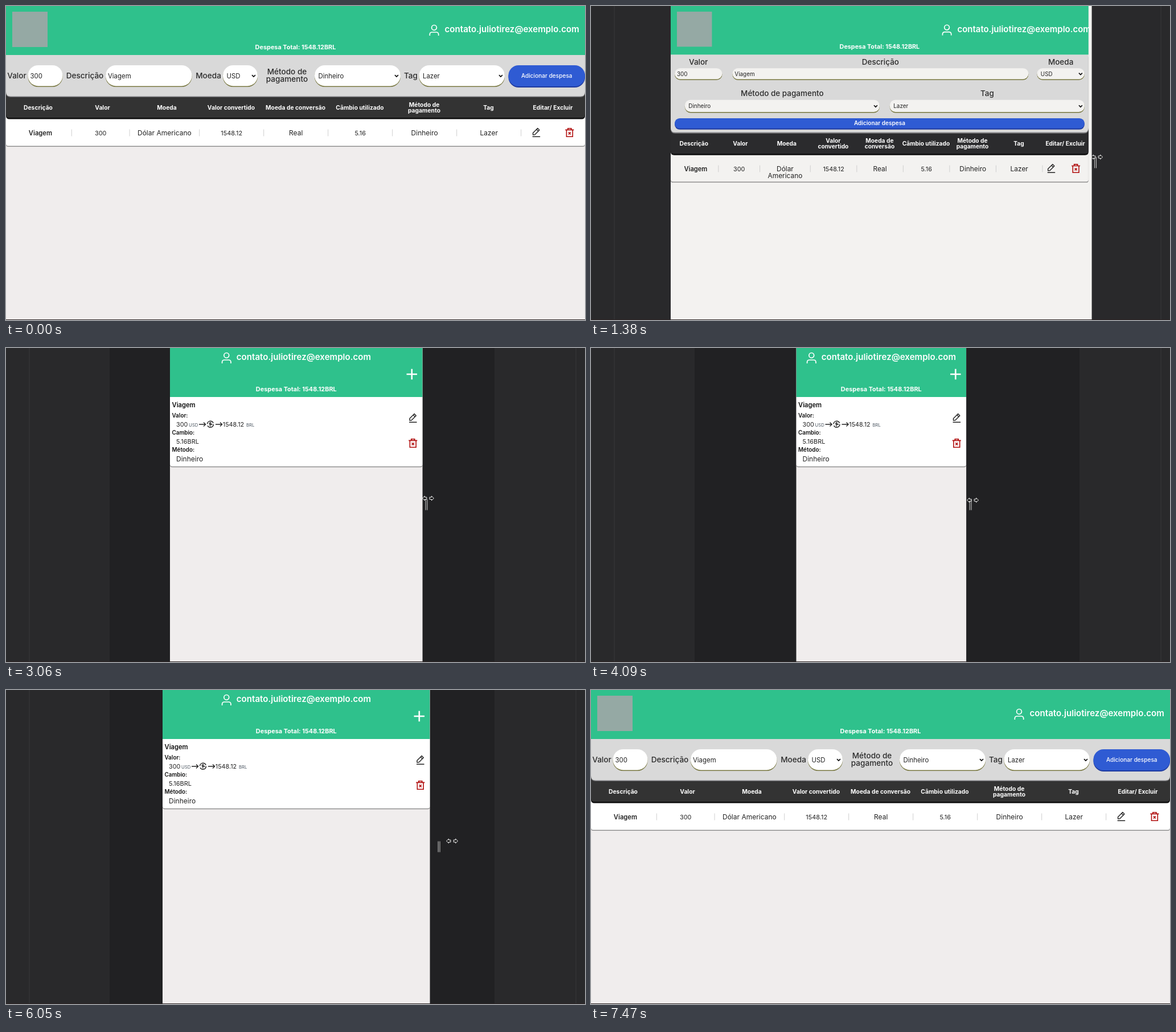
Recreate the animation shown at these times as an HTML page. Size 1017 by 551 pixels, loop 8 s.

```html
<!DOCTYPE html>
<html lang="pt-BR">
<head>
<meta charset="utf-8">
<title>Carteira de despesas</title>
<style>
html, body { margin: 0; width: 100%; height: 100%; overflow: hidden; background: #212123; }
svg { display: block; width: 1017px; height: 551px; font-family: Inter, Roboto, sans-serif; }
</style>
</head>
<body>
<svg id="stage" viewBox="0 0 1017 551" xmlns="http://www.w3.org/2000/svg"></svg>
<script>
const LOOP = 8000;
const EMAIL = 'contato.juliotirez@exemplo.com';
const INK = '#222', RED = '#b00d0d', GREEN = '#2fc18c';
const stage = document.getElementById('stage');

// [time, left edge of the viewport], held until the next entry
const steps = [
  [0, 0], [280, 6], [400, 16], [520, 30], [640, 42],
  [780, 56], [900, 72], [1020, 88], [1140, 104], [1260, 122], [1380, 140], [1500, 154],
  [1620, 168], [1740, 182], [1860, 196], [1980, 208], [2100, 220], [2220, 230],
  [2370, 239], [2490, 247], [2640, 253], [2760, 258], [2910, 270], [3060, 288], [3180, 306],
  [3320, 318], [3440, 328], [3590, 345], [3710, 360], [4090, 360.5], [4210, 362], [4330, 365],
  [4450, 367], [4740, 368], [4860, 369], [5660, 364], [5810, 335], [5930, 304], [6050, 275],
  [6200, 240], [6320, 207], [6440, 176], [6590, 148], [6710, 120], [6840, 92],
  [6990, 66], [7110, 42], [7230, 20], [7350, 6], [7470, 0]
];

// [time, pointer offset, pointer y, grip offset], eased linearly
const pointer = [
  [280, 9, 268, 7], [1380, 9, 265, 6.5], [2220, 8.5, 261, 6.5], [4090, 11.5, 267, 7.5],
  [4860, 12, 267, 7.5], [5660, 20, 267, 10], [6050, 39, 265, 16], [6440, 24, 272, 12],
  [6840, 19.5, 280, 10], [7470, 14, 280, 8]
];

const rect = (x, y, w, h, fill, r = 0) =>
  `<rect x="${x}" y="${y}" width="${w}" height="${h}" rx="${r}" fill="${fill}"/>`;

const line = (d, color, width = 1, extra = '') =>
  `<path d="${d}" fill="none" stroke="${color}" stroke-width="${width}" ${extra}/>`;

function text(x, y, str, size, { weight = 400, fill = INK, anchor = 'start' } = {}) {
  return `<text x="${x}" y="${y}" font-size="${size}" font-weight="${weight}" fill="${fill}" text-anchor="${anchor}">${str}</text>`;
}

const mid = (x, y, str, size, weight, fill) => text(x, y, str, size, { weight, fill, anchor: 'middle' });
const at = (x, y, body) => `<g transform="translate(${x} ${y})">${body}</g>`;

// Box with rounded bottom corners
const slab = (y, w, h, r, fill) =>
  `<path d="M0 ${y}h${w}v${h - r}q0 ${r} ${-r} ${r}h${2 * r - w}q${-r} 0 ${-r} ${-r}z" fill="${fill}"/>`;

const userIcon = (x, y) => at(x, y,
  '<circle cy="-4.6" r="4.4" fill="none" stroke="#fff" stroke-width="1.7"/>' +
  line('M-7.7 9.5v-2q0-4 4-4h7.4q4 0 4 4v2', '#fff', 1.7));

const pencil = (x, y) => at(x, y,
  line('M-6.5 7.3h13.5', INK, 1.5) +
  line('M-5.6 4v-3.2l8.2-8.2 3.1 3.1-8.2 8.2zM.7-5.4l3.1 3.1', INK, 1.4, 'stroke-linejoin="round"'));

const trash = (x, y) => at(x, y,
  line('M-7.5-4.6h15M-3-4.6v-2.6h6v2.6M-5.4-4.6v11.8h10.8v-11.8M-2-.6l4 4M2-.6l-4 4', RED, 1.6));

const arrow = (x, y) => at(x, y, line('M0 0h11.5M8-3.5l3.6 3.5-3.6 3.5', INK, 1.3));

const coin = (x, y) => at(x, y,
  '<circle r="5.5" fill="none" stroke="#222" stroke-width="1.5" stroke-dasharray="14.3 3"/>' +
  line('M2-2q-4-1.4-4 .4t4 1.6-4 1.6M0-4v8', INK, 1.1));

function field(x, y, w, h, value, { r = 10, size = 10, select = false, fill = '#fff' } = {}) {
  const cy = y + h / 2;
  let out = rect(x, y + 1, w, h, '#77763f', r) + rect(x, y, w, h - .6, fill, r);
  out += text(x + (select ? 6.5 : 4), cy + size * .36, value, size);
  if (select) out += line(`M${x + w - 10} ${cy - 1.4}l3 3 3-3`, '#111', 1.7);
  return out;
}

function button(x, y, w, h, r, weight) {
  return rect(x, y + 1.5, w, h - 1.5, '#1f3ba0', r) + rect(x, y, w, h - 2, '#2f5bd3', r) +
    mid(x + w / 2, y + h / 2 + 2.6, 'Adicionar despesa', 10.1, weight, '#fff');
}

const label = (x, y, str) => mid(x, y, str, 13.6, 500, '#2b2b2b');

function header(w, wide, emailRight) {
  let out = rect(0, 0, wide, 86, GREEN);
  if (w < 500) {
    const c = w / 2;
    out += userIcon(c - 122.5, 17.5) + text(c - 105, 21, EMAIL, 15.1, { weight: 600, fill: '#fff' }) +
      line(`M${w - 28} 46h18.5M${w - 18.75} 36.8v18.5`, '#fff', 2.6);
  } else {
    const x = emailRight - 238;
    out = rect(0, 0, w, 86, GREEN) + rect(11, 10, 62, 62, '#95a9a4') +
      userIcon(x - 18.5, 42.5) + text(x, 46, EMAIL, 15.1, { weight: 600, fill: '#fff' });
  }
  return out + mid(w / 2, 76, 'Despesa Total: 1548.12BRL', 10.9, 700, '#fff');
}

function formInline(w) {
  const k = w / 1017;
  const opt = { r: 18, size: 11.4 }, sel = { ...opt, select: true };
  const box = (x, end, value, o) => field(x * k, 104, (end - x) * k, 37, value, o);
  return slab(90, w, 70, 8, '#77777a') + slab(86, w, 72.5, 8, '#d9d9d9') +
    label(19 * k, 127, 'Valor') + box(38.5, 99.5, '300', opt) +
    label(138.5 * k, 127, 'Descrição') + box(175, 326.5, 'Viagem', opt) +
    label(355.5 * k, 127, 'Moeda') + box(381, 442, 'USD', sel) +
    label(493.5 * k, 120, 'Método de') + label(493.5 * k, 133, 'pagamento') +
    box(542, 693, 'Dinheiro', sel) +
    label(711 * k, 127, 'Tag') + box(725.5, 876, 'Lazer', sel) +
    button(882.5 * k, 104, 134.5 * k, 39, 18, 500);
}

function formStacked(w, paper) {
  const small = 45 + .053 * w, half = (w - 50) / 2;
  const dx = small + 25, dw = w - 2 * small - 47;
  const opt = { fill: paper }, sel = { fill: paper, select: true };
  return slab(90, w, 135.5, 8, '#77777a') + slab(86, w, 137.6, 8, '#d9d9d9') +
    label(7 + small / 2, 104, 'Valor') + field(7, 110, small, 20, '300', opt) +
    label(dx + dw / 2, 104, 'Descrição') + field(dx, 110, dw, 20, 'Viagem', opt) +
    label(w - 7 - small / 2, 104, 'Moeda') + field(w - 7 - small, 110, small, 20, 'USD', sel) +
    label(25 + half / 2, 159.5, 'Método de pagamento') + field(25, 166, half, 22, 'Dinheiro', sel) +
    label(w - 7 - half / 2, 159.5, 'Tag') + field(w - 7 - half, 166, half, 22, 'Lazer', sel) +
    button(7, 198.5, w - 14, 20, 9, 600);
}

// Title, second line when wrapped, width needed for one line
const heads = [
  ['Descrição'], ['Valor'], ['Moeda'], ['Valor', 'convertido', 83], ['Moeda de', 'conversão', 107],
  ['Câmbio', 'utilizado', 81.5], ['Método de', 'pagamento', 130], ['Tag'], ['Editar/ Excluir']
];
const cells = ['Viagem', '300', 'Dólar Americano', '1548.12', 'Real', '5.16', 'Dinheiro', 'Lazer'];

function table(w, y, paper, dark) {
  const col = w / 9, row = y + 39, base = row + 28.5;
  let out = slab(y - 8, w, 47.5, 6, '#0c0c0d') + slab(y - 8, w, 45, 6, dark);
  heads.forEach(([a, b, need], i) => {
    const x = (i + .5) * col;
    const put = (dy, str) => { out += mid(x, y + dy, str, 10.3, 700, '#fff'); };
    if (!b) put(22.5, a);
    else if (need > col) { put(18, a); put(27.6, b); }
    else put(22.5, a + ' ' + b);
  });
  const back = slab(row - 8, w, 57, 4, '#8f8f8f') + slab(row - 8, w, 55.4, 4, paper);
  out = back + out;

  const edge = i => i === 0 ? .0055 * w : i === 1 ? col + 2.3 : i === 2 ? .2134 * w : i * col + .7;
  cells.forEach((str, i) => {
    const x = (edge(i) + edge(i + 1)) / 2;
    const size = /\d/.test(str) ? 10.9 : i ? 12 : 11.2;
    if (i === 2 && edge(3) - edge(2) < 95) {
      str.split(' ').forEach((part, n) => { out += mid(x, base + n * 13, part, 12); });
    } else out += mid(x, base, str, size, i ? 400 : 600);
    out += line(`M${edge(i + 1)} ${base - 10}v12`, '#cfcfcf');
  });
  return out + pencil(.929 * w - 13.6, row + 24) + trash(.983 * w - 9.8, row + 24);
}

function card(w, y) {
  const bold = (dy, str, size = 9.9) => text(3.5, y + dy, str, size, { weight: 600, fill: '#111' });
  const unit = (x, str) => text(x, y + 51.5, str, 7.7, { fill: '#4a5560' });
  return slab(y, w, 123.3, 4, '#8f8f8f') + slab(y, w, 121.8, 4, '#fff') +
    bold(17.5, 'Viagem', 11.2) + bold(35.5, 'Valor:') +
    text(11, y + 51.5, '300', 10.8) + unit(33, 'USD') + arrow(51, y + 48) + coin(71, y + 47.8) +
    arrow(80, y + 48) + text(92.8, y + 51.5, '1548.12', 10.8) + unit(134, 'BRL') +
    bold(66, 'Cambio:') + text(11, y + 82, '5.16BRL', 10.9) +
    bold(96, 'Método:') + text(11, y + 113, 'Dinheiro', 12) +
    pencil(w - 17, y + 37) + trash(w - 16.8, y + 81);
}

function page(left, w) {
  const emailRight = .9485 * w + 43.9;
  const mobile = w < 500, cards = w < 650, inline = w >= 950;
  const scale = mobile ? 1 : Math.min(1, w / emailRight);
  const tinted = !cards && !inline;
  const paper = tinted ? '#f3f2f0' : '#fff';
  let body = '';
  if (mobile) body += card(w, 86);
  else if (cards) body += card(w, 224.6) + formStacked(w, paper);
  else if (inline) body += table(w, 159, paper, '#333') + formInline(w);
  else body += table(w, 224.3, paper, '#2b2b2d') + formStacked(w, paper);
  return `<clipPath id="view"><rect x="${left}" width="${w}" height="550"/></clipPath>` +
    rect(left, 0, w, 550, tinted ? '#f3f2f0' : '#f0eded') +
    `<g clip-path="url(#view)"><g transform="translate(${left} 0) scale(${scale})">` +
    body + header(w, w / scale, emailRight) + '</g></g>';
}

function backdrop() {
  return rect(0, 0, 1017, 551, '#212123') + rect(0, 0, 182, 551, '#29292b') +
    rect(858, 0, 159, 551, '#29292b') + rect(40, 0, 2, 551, '#303032') + rect(1000, 0, 2, 551, '#303032');
}

function mix(keys, t) {
  const i = Math.max(1, keys.findIndex(k => k[0] >= t));
  const a = keys[i - 1], b = keys[i], p = (t - a[0]) / (b[0] - a[0]);
  return a.map((v, n) => v + (b[n] - v) * p);
}

function resizer(right, t) {
  const [, dx, y, grip] = mix(pointer, t);
  const g = right + grip;
  const half = '<path d="M-10 0l4-3.8v2h3.4v3.6h-3.4v2z" fill="#111" stroke="#fff" stroke-width="1"/>';
  return line(`M${g - 1.4} 265.5v19M${g + 1.4} 265.5v19`, '#c4c4c4', 1.1) +
    at(right + dx, y, half + `<g transform="scale(-1 1)">${half}</g>`);
}

let shown = -1;
function draw(now) {
  const t = now % LOOP;
  let i = steps.length - 1;
  while (steps[i][0] > t) i--;
  if (i !== shown) {
    shown = i;
    const [time, left] = steps[i];
    const right = Math.min(1017, 1019.6 - left);
    stage.innerHTML = backdrop() + page(left, right - left) +
      (left ? resizer(right, time) : '') + rect(0, 550, 1017, 1, '#2c2424');
  }
  requestAnimationFrame(tick);
}

const start = performance.now();
function tick() { draw(performance.now() - start); }
tick();
</script>
</body>
</html>
```
